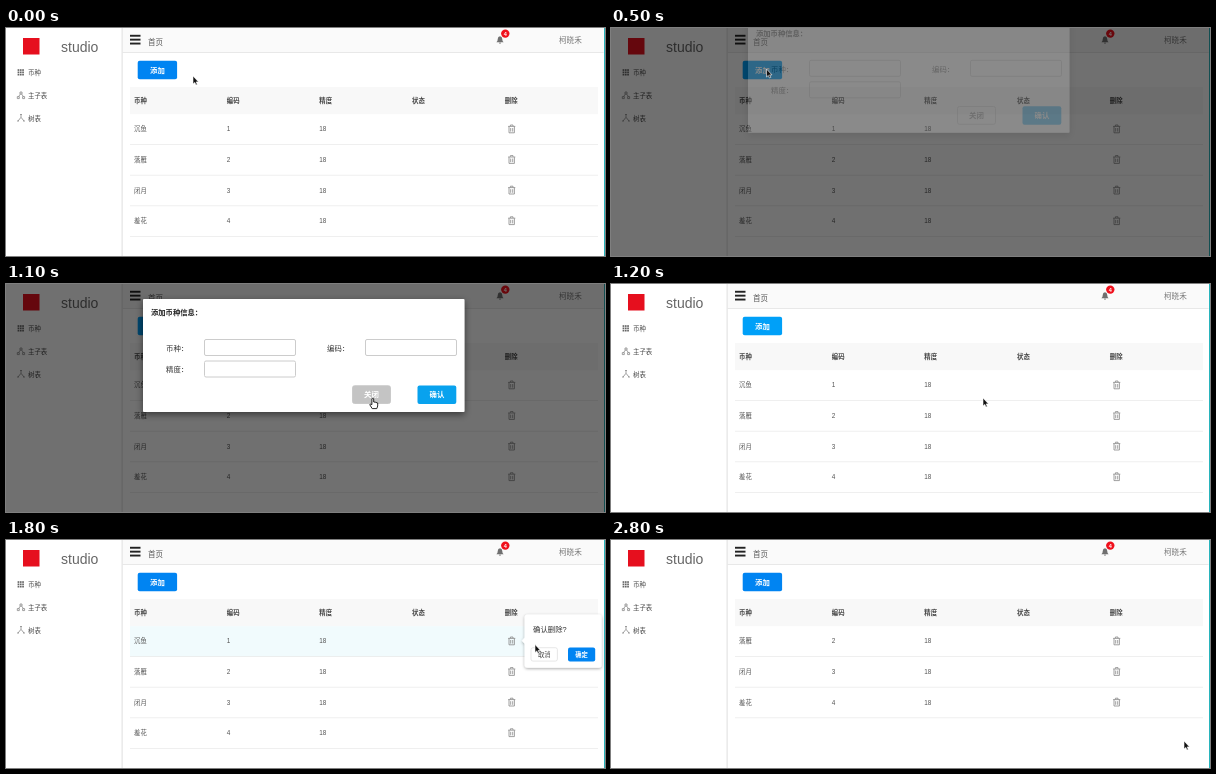
An HTML page that plays this animation: 599x228 px, repeating every 2.9 s.

```html
<!DOCTYPE html>
<html lang="zh-CN">
<head>
<meta charset="utf-8">
<title>币种</title>
<style>
  html, body { margin: 0; width: 100%; height: 100%; overflow: hidden; background: #fff; }
  svg { display: block; width: 599px; height: 228px; }
  text { font-family: "Liberation Sans", "Noto Sans CJK SC", "Noto Sans CJK", sans-serif; white-space: pre; }
  .b { font-weight: 700; }
  .line { fill: none; stroke: #888; stroke-width: .8; }
</style>
</head>
<body>
<svg id="stage" viewBox="0 0 599 228"></svg>
<script>
const LOOP = 2900, STEP = 100, ROW_H = 30.6;
const BLUE = '#0084f2', HOVER = '#00a0f8';
const ROWS = ['沉鱼', '落雁', '闭月', '羞花'];
const COLS = [128, 220.8, 313.3, 406, 498.8];

// Markup helpers; text is placed by its vertical centre.
const text = (s, x, cy, size, fill = '#555', extra = '') =>
  `<text x="${x}" y="${cy + size * .37}" font-size="${size}" fill="${fill}" ${extra}>${s}</text>`;
const rect = (x, y, w, h, fill, extra = '') =>
  `<rect x="${x}" y="${y}" width="${w}" height="${h}" fill="${fill}" ${extra}/>`;
const label = (s, x, cy, size, fill, extra = '') =>
  text(s, x, cy, size, fill, `class="b" text-anchor="middle" ${extra}`);
const button = (s, x, y, w, h, size, fill, id = '') =>
  rect(x, y, w, h, fill, `rx="2" id="${id}"`) + label(s, x + w / 2, y + h / 2, size, '#fff');
const field = (s, x, cy, boxX) =>
  text(s + '：', x, cy, 7.4, '#333') +
  rect(boxX, cy - 8.7, 91, 16, '#fff', 'rx="1.5" stroke="#ccc" stroke-width="1"');

const trash = cy => `<g transform="translate(505.7 ${cy})" class="line">
  <path d="M-3.6-2.6H3.6M-1.3-2.8V-4H1.3V-2.8M-2.7-2.4V3.8H2.7V-2.4M-1-1V2.6M1-1V2.6"/></g>`;

const row = (name, i) => {
  const cy = 101 + ROW_H * i;
  return `<g id="row${i}">
    ${i ? '' : rect(124, 86.2, 468, ROW_H, '#ebf6fe', 'id="tint"')}
    <g id="cells${i}">
      ${text(name, COLS[0], cy, 6.4)}${text(i + 1, COLS[1], cy, 6.4)}
      ${text('18', COLS[2], cy, 6.4)}${trash(cy)}
    </g>
    ${rect(124, 116.2 + ROW_H * i, 468, .8, '#ececec')}
  </g>`;
};

const thirds = [0, 1, 2];
const grid = thirds.map(r => thirds.map(c => rect(11.6 + 2.3 * c, 41.2 + 2.3 * r, 1.7, 1.7, '#666')).join('')).join('');

const sidebar = rect(0, 0, 116, 228, '#fff') + rect(115.6, 0, 1, 228, '#dedede') +
  rect(17, 10, 16.5, 16.5, '#e60f1e') + text('studio', 55, 18.5, 14, '#666') + grid +
  `<path class="line" d="M14 64h2v2h-2zM11.3 68.6h2v2h-2zM16.6 68.6h2v2h-2zM14.4 66l-1.8 2.6M15.6 66l1.8 2.6"/>
   <path class="line" d="M15 86.5v2.8L12 93M15 89.3L18 93M14 86.5h2M11 93h2M17 93h2"/>` +
  ['币种', '主子表', '树表'].map((s, i) => text(s, 22, 44.7 + 22.8 * i, 6.4, '#444')).join('');

const header = rect(116.6, 0, 481, 24.5, '#fafafa') + rect(116.6, 24, 481, .8, '#e4e4e4') +
  thirds.map(i => rect(124, 6.8 + 3.9 * i, 10.5, 1.9, '#222')).join('') +
  text('首页', 142, 14, 7.5, '#555') +
  `<path d="M490.4 14.2q1.4-1 1.4-3.4q0-2.6 2.2-2.6t2.2 2.6q0 2.4 1.4 3.4zM493 14.8h2q-.2 1-1 1t-1-1z" fill="#707070"/>
   <circle cx="499.3" cy="5.6" r="4.2" fill="#f0101c"/>` +
  label('4', 499.3, 5.6, 5.5, '#fff') +
  text('柯晓禾', 553, 12.6, 7.6, '#777');

const table = button('添加', 131.7, 32.7, 39.4, 18.6, 7.4, BLUE, 'add') +
  rect(124, 59, 468, 27.2, '#f8f8f8') +
  ['币种', '编码', '精度', '状态', '删除'].map((s, i) => text(s, COLS[i], 72.3, 6.4, '#444', 'class="b"')).join('') +
  ROWS.map(row).join('');

const popover = `<g id="pop">
  <g filter="url(#soft)">
    <path d="M519 97.5l-3.2 3.3l3.2 3.3z" fill="#fff"/>
    ${rect(518.6, 74.4, 77, 53.4, '#fff', 'rx="3"')}
  </g>
  ${text('确认删除?', 527, 89, 7.4, '#333')}
  ${rect(525, 107.7, 26.4, 13.4, '#fff', 'rx="2" stroke="#ddd" stroke-width=".7"')}
  ${text('取消', 538.2, 114.4, 6.3, '#444', 'text-anchor="middle"')}
  ${button('确定', 562, 107.5, 27.2, 14, 6.3, BLUE)}
</g>`;

const modal = rect(0, 0, 599, 228, '#000', 'id="shade"') + `<g id="modal">
  ${rect(137, 15, 321.5, 113, '#fff', 'rx="1" filter="url(#deep)"')}
  ${text('添加币种信息：', 145, 28, 7.3, '#222', 'class="b"')}
  ${field('币种', 160, 64.2, 198.5)}${field('编码', 321, 64.2, 359.5)}${field('精度', 160, 85.7, 198.5)}
  ${rect(346.5, 101.7, 38, 17.8, '#fff', 'id="close" rx="2" stroke="#c4c4c4" stroke-width=".8"')}
  ${label('关闭', 365.5, 110.7, 7.4, '#777', 'id="closeText"')}
  ${button('确认', 411.5, 101.5, 38.8, 18.4, 7.4, '#08a2ee')}
</g>`;

const cursor = `<g id="cursor" stroke-linejoin="round">
  <path id="arrow" d="M0 0V8L1.8 6.4L3 9L4.3 8.4L3.1 5.9H5.5Z" fill="#111" stroke="#fff" stroke-width=".6"/>
  <path id="hand" d="M-.9.8Q0-.4.9.8V4L2.5 4.2L4.9 5V8L4 10.6H-.6L-3 6.8Q-3 5.4-.9 6.6Z"
    fill="#fff" stroke="#111" stroke-width=".9"/>
</g>`;

const shadow = (id, dy, blur, alpha) => `<filter id="${id}" x="-20%" y="-20%" width="140%" height="140%">
  <feDropShadow dx="0" dy="${dy}" stdDeviation="${blur}" flood-opacity="${alpha}"/></filter>`;

document.getElementById('stage').innerHTML =
  `<defs>${shadow('soft', 1, 1.6, .35)}${shadow('deep', 2.5, 3.5, .5)}</defs>` +
  rect(0, 0, 599, 228, '#fff') + header + sidebar + table +
  rect(598, 0, 1, 228, '#28b4bc') + popover + modal + cursor;

const $ = id => document.getElementById(id);
const set = (id, name, value) => $(id).setAttribute(name, value);
const show = (id, on) => set(id, 'opacity', +on);
const move = (id, x, y) => set(id, 'transform', `translate(${x} ${y})`);
const clamp = v => Math.min(1, Math.max(0, v));
const easeOut = p => 1 - (1 - p) ** 2;
const easeInOut = p => p < .5 ? 2 * p * p : 1 - 2 * (1 - p) ** 2;
const within = (t, a, b) => t >= a && t < b;

// time, x, y, pointing hand
const PATH = [
  [0, 187, 48, 0], [300, 156, 41, 1], [500, 155.5, 41, 0], [700, 215, 68, 0],
  [1000, 362, 113, 1], [1100, 366.8, 114, 1], [1200, 372, 114, 0], [1400, 512, 100, 0],
  [1500, 506, 99, 1], [1600, 507, 99, 1], [1700, 518, 102, 0], [1800, 529, 104.5, 0],
  [2000, 536, 110, 1], [2300, 577, 114, 1], [2500, 578, 114, 1], [2600, 577, 145, 0],
  [2700, 574, 185, 0], [2800, 573, 201, 0]
];

function drawCursor(t) {
  const i = PATH.findLastIndex(p => p[0] <= t);
  const a = PATH[i], b = PATH[i + 1] || a;
  const k = b === a ? 0 : (t - a[0]) / (b[0] - a[0]);
  move('cursor', a[1] + (b[1] - a[1]) * k, a[2] + (b[2] - a[2]) * k);
  show('hand', a[3]);
  show('arrow', !a[3]);
}

function draw(t) {
  // Dialog: the shade fades first, then the panel fades and drops in.
  const open = t < 1200 ? t - 473 : -LOOP;
  show('shade', .56 * clamp((open + 150) / 150));
  show('modal', clamp(open / 150));
  move('modal', 0, -28 * (1 - easeOut(clamp(open / 300))));
  const overClose = t >= 1000;
  set('close', 'fill', overClose ? '#c4c4c4' : '#fff');
  set('closeText', 'fill', overClose ? '#fff' : '#777');
  set('add', 'fill', within(t, 300, 1500) ? HOVER : BLUE);

  show('tint', within(t, 1300, 1900));
  set('tint', 'fill', t < 1700 ? '#ebf6fe' : '#f1fbfd');
  show('pop', within(t, 1600, 2500) ? 1 : t === 2500 ? .4 : 0);

  // Deleted row: slide left and fade, then the rows below close the gap.
  const leave = easeInOut(clamp((t - 2368) / 250));
  const fold = easeOut(clamp((t - 2618) / 180));
  move('cells0', -30 * leave, 0);
  show('cells0', 1 - leave);
  show('row0', fold === 0);
  for (let i = 1; i < ROWS.length; i++) move('row' + i, 0, -ROW_H * fold);

  drawCursor(t);
}

const start = performance.now();
function tick() {
  const t = (performance.now() - start) % LOOP;
  draw(Math.floor(t / STEP) * STEP);
  requestAnimationFrame(tick);
}
tick();
</script>
</body>
</html>
```
